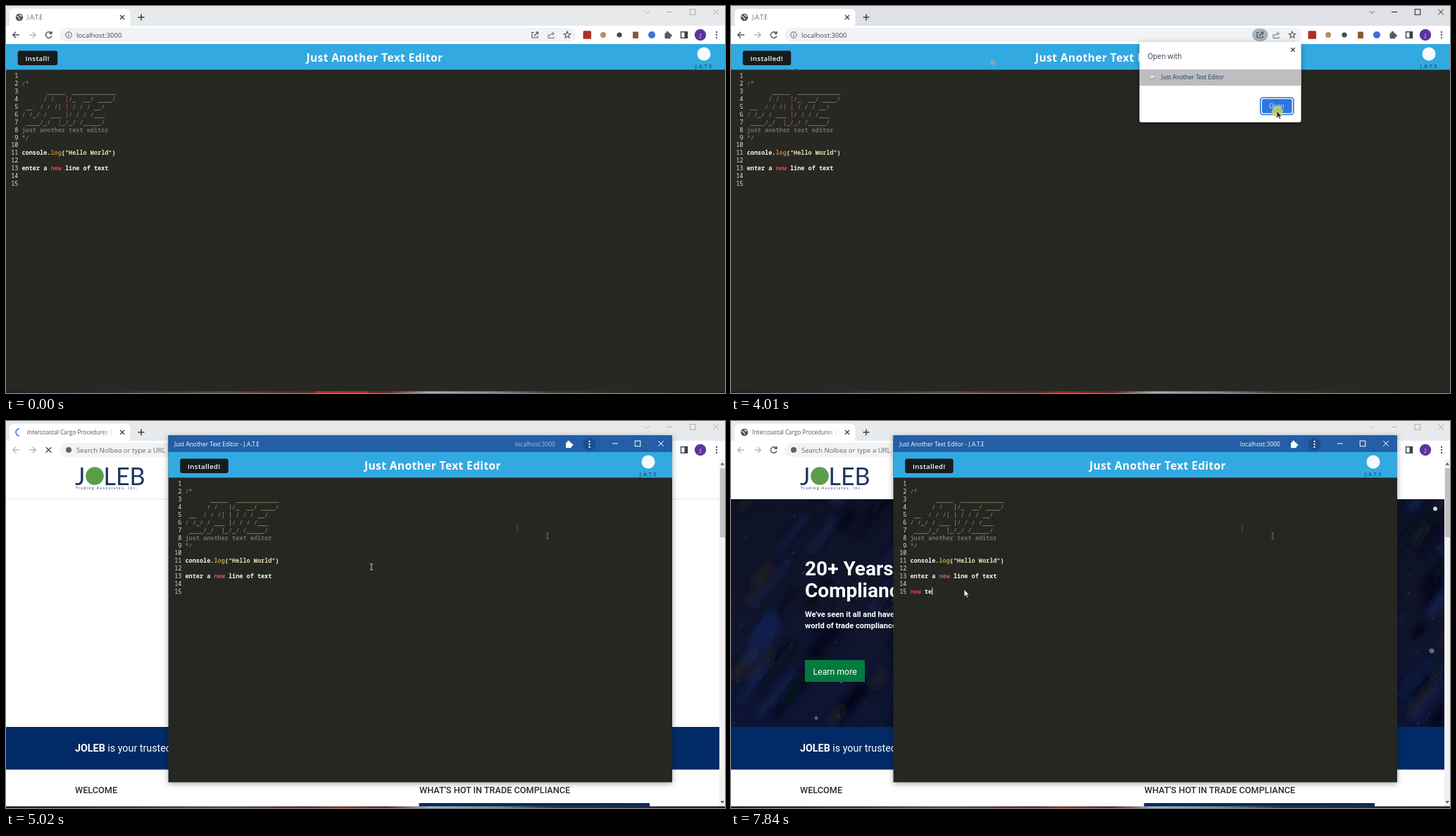
Animation, 1021 px wide and 549 px high, one loop 8000 ms. Source, as an HTML page:

```html
<!DOCTYPE html>
<html lang="en">
<head>
<meta charset="utf-8">
<title>Text editor demo</title>
<style>
html, body { margin: 0; width: 100%; height: 100%; overflow: hidden; background: #272822; }
svg { display: block; width: 1021px; height: 549px; }
text { white-space: pre; font-family: "Open Sans", "Noto Sans", sans-serif; }
.mono { font-family: "Noto Sans Mono", "DejaVu Sans Mono", monospace; font-size: 8.54px; }
.site { font-family: Roboto, Arial, sans-serif; }
.mark { font-family: Lato, sans-serif; }
</style>
</head>
<body>
<svg id="stage" viewBox="0 0 1021 549" xmlns="http://www.w3.org/2000/svg"></svg>
<script>
const LOOP = 8000, STEP = 201.2, LEAD = 25;
const stage = document.getElementById('stage');

const defs = `<defs>
  <linearGradient id="strip">
    <stop offset="0" stop-color="#1c1a20"/><stop offset=".2" stop-color="#3a3238"/>
    <stop offset=".3" stop-color="#55484c"/><stop offset=".42" stop-color="#5c2528"/>
    <stop offset=".46" stop-color="#9c2a26"/><stop offset=".53" stop-color="#6a2024"/>
    <stop offset=".59" stop-color="#a9b2b8"/><stop offset=".68" stop-color="#83888e"/>
    <stop offset=".76" stop-color="#3c3438"/><stop offset="1" stop-color="#241b20"/>
  </linearGradient>
  <linearGradient id="sky" x2="0" y2="1">
    <stop offset="0" stop-color="#0d1226"/><stop offset=".5" stop-color="#10152b"/>
    <stop offset="1" stop-color="#0d1535"/>
  </linearGradient>
  <clipPath id="heroClip"><rect x="0" y="111" width="1013" height="323"/></clipPath>
  <linearGradient id="fade"><stop offset=".85" stop-color="#fff"/><stop offset="1" stop-color="#000"/></linearGradient>
  <mask id="tabMask"><rect x="28" y="5" width="126" height="22" fill="url(#fade)"/></mask>
  <filter id="shadow" x="-10%" y="-10%" width="120%" height="125%">
    <feDropShadow dx="0" dy="2" stdDeviation="4" flood-opacity=".35"/></filter>
  <filter id="soft"><feGaussianBlur stdDeviation="1"/></filter>
  <filter id="cloud"><feGaussianBlur stdDeviation="5"/></filter>
</defs>`;

const rect = (x, y, w, h, fill, r = 0, more = '') =>
  `<rect x="${x}" y="${y}" width="${w}" height="${h}" rx="${r}" fill="${fill}" ${more}/>`;
const dot = (x, y, r, fill, more = '') => `<circle cx="${x}" cy="${y}" r="${r}" fill="${fill}" ${more}/>`;
const line = (d, color, w = 1.2, more = '') =>
  `<path d="${d}" fill="none" stroke="${color}" stroke-width="${w}" ${more}/>`;
const text = (x, y, s, size, fill, more = '') =>
  `<text x="${x}" y="${y}" font-size="${size}" fill="${fill}" ${more}>${s}</text>`;
const group = (s, more) => `<g ${more}>${s}</g>`;
const move = (x, y, s, more = '') => group(s, `transform="translate(${x} ${y})" ${more}`);
const span = (s, fill) => `<tspan fill="${fill}">${s}</tspan>`;
const cross = (x, y, r, color, w = 1.1) =>
  line(`M${x - r} ${y - r}l${2 * r} ${2 * r}M${x + r} ${y - r}l${-2 * r} ${2 * r}`, color, w);
const kebab = (x, y, color) => [-4, 0, 4].map(d => dot(x, y + d, 1.15, color)).join('');

function puzzle(x, y, color) {
  return rect(x - 4.5, y - 2.8, 8, 8, color, 1) + dot(x - .7, y - 3.4, 1.8, color) + dot(x + 4, y + 1, 1.8, color);
}

function controls(xs, y, color) {
  const [a, b, c] = xs;
  return line(`M${a - 4} ${y}h8`, color, 1) +
    rect(b - 3.8, y - 3.8, 7.6, 7.6, 'none', 0, `stroke="${color}"`) + cross(c, y, 3.8, color, 1);
}

function globe(x, y) {
  return dot(x, y, 5.2, '#50555a') +
    line(`M${x - 4} ${y - 1}q2 -1 3 1t2 3M${x} ${y - 4}q1 3 4 2`, '#e8eaec', 1.3);
}

const star = (x, y, r) => line('M' + Array.from({length: 10}, (_, i) => {
  const a = i * Math.PI / 5 - Math.PI / 2, q = i % 2 ? r * .45 : r;
  return (x + q * Math.cos(a)).toFixed(1) + ' ' + (y + q * Math.sin(a)).toFixed(1);
}).join('L') + 'Z', '#555', 1.1);

// ---- editor page ----
const art = [
  '       _____  ____________',
  '      / /   |/_  __/ ____/',
  ' __  / / /| | / / / __/',
  '/ /_/ / ___ |/ / / /___',
  ' ____/_/  |_/_/ /_____/'
];

function editor(inApp, typed) {
  const faint = inApp ? '#7b7552' : '#716d62', bar = inApp ? '#827b55' : '#945040';
  const lines = ['', span('/*', faint),
    ...art.map(s => span(s.replace(/\|/g, span('|', bar)), faint)),
    span('just another text editor', '#716e60'), span('*/', faint), '',
    'console.' + span('log', inApp ? '#b9a032' : '#c07f35') + '(' + span('"Hello World"', '#e8dfae') + ')', '',
    'enter a ' + span('new', inApp ? '#b4605a' : '#dc4644') + ' line of text', '',
    typed.replace(/^new/, span('new', '#d3337c'))];
  return lines.map((s, i) => {
    const y = 102.3 + i * 10.9;
    return `<text class="mono" x="17.4" y="${y}" text-anchor="end" fill="#e2e2db" font-weight="500">${i + 1}</text>` +
      (s ? `<text class="mono" x="22.5" y="${y}" fill="#f8f8f2" font-weight="600">${s}</text>` : '');
  }).join('');
}

function header(w, titleX, logoX, label) {
  const bw = label === 'Install!' ? 56.5 : 68.5;
  return rect(0, 54, w, 36.4, '#32a9e1') + rect(16.7, 63.5, bw, 20.5, '#191c1f', 3) +
    text(27.5, 77.6, label, 9.6, '#fff', 'font-weight="600" letter-spacing=".4"') +
    text(titleX, 79, 'Just Another Text Editor', 15.5, '#fff', 'font-weight="700" letter-spacing=".4"') +
    dot(logoX, 68, 9.5, '#f4fafd') +
    text(logoX, 88, 'J.A.T.E', 6.8, '#1d4b70', 'font-weight="600" letter-spacing=".8" text-anchor="middle"');
}

// ---- browser frame ----
function browser(k) {
  const loaded = k >= 23, away = k >= 21, blurry = away && !loaded;
  const active = k > 0 && !away, loading = away && k < 29;
  const ctl = active ? '#222' : '#a9abae';
  const tab = blurry ? 'chrome://newtab' : loaded ? 'Intercoastal Cargo Procedures |' : 'J.A.T.E';
  const ink = '#4d5156', nav = away ? '#b5b8bb' : ink;
  const spin = k * 100 - 2500;
  const left = rect(5, 4, 171.5, 26, '#fff', 6) +
    (loading ? line('M19 11a5 5 0 0 0 0 10', blurry ? '#a8c4e6' : '#2f6fd0', 1.6, `transform="rotate(${spin} 19 16)"`) : globe(19, 16)) +
    group(text(30, 19, tab, 8.2, away ? '#50545a' : '#4d6a80'), 'mask="url(#tabMask)"') +
    cross(165, 16, 3, '#3c4043', 1.4) + line('M187.5 16h9M192 11.5v9', '#3c4043', 1.5);
  const bar = rect(76, 31, 734, 20, '#f1f3f4', 10) +
    line('M19 41h-9m4 -4.2l-4.3 4.2l4.3 4.2', nav, 1.4) +
    line('M33 41h9m-4 -4.2l4.3 4.2l-4.3 4.2', '#b5b8bb', 1.4) +
    (loading ? cross(60.5, 41, 3.8, '#4d5156', 1.5) :
      line('M64.3 38.6a4.3 4.3 0 1 0 .6 3.6M65 36v3.2h-3.4', ink, 1.4)) +
    (away ? dot(89, 41, 4, blurry ? '#5b8ddb' : '#5f6368') :
      dot(89, 41, 4.3, 'none', 'stroke="#5f6368"') + line('M89 40.3v3.2M89 38.3v1.1', '#5f6368', 1.1)) +
    text(100, 44.5, away ? 'Search Nolbea or type a URL' : 'localhost:3000', 9.55, away ? '#666a6e' : '#42464a');
  const f = blurry ? 'filter="url(#soft)" opacity=".75"' : '';
  const hot = k >= 12 && k <= 20;
  return rect(0, 0, 1021, 28, active ? '#dee1e6' : '#e7eaed') + rect(0, 28, 1021, 26, '#fff') +
    group(left, f) + group(bar, f) +
    line('M906.5 7l3.5 3.5l3.5 -3.5', active ? '#666' : '#aaa', 1) + controls([942, 975, 1008], 8.5, ctl) +
    (hot ? rect(740, 32, 22.5, 18, '#a6b4bd', 9) : '') +
    line('M750 37.5h-3v7.5h8v-3M752 37h3.5v3.5M755 37.5l-5 5', '#4a4e52', 1.1) +
    line('M770 40v5.5h8v-2M771.5 43q.5 -4 5 -4M775 36.5l3.5 2.5l-3.5 2.7', '#666a6e', 1) +
    star(797, 41, 5) +
    rect(819.5, 35.3, 11.5, 11.5, '#b02f28', 1.5) + dot(848, 41, 4, '#b48e66') + dot(871, 41, 3.6, '#4a4a4a') +
    rect(890, 36.5, 8, 9.5, '#8a5a32', 1) + dot(917, 41, 5, '#3f70d8') + puzzle(940, 41, '#55595d') +
    rect(958.5, 36.7, 9, 8.6, 'none', 0, 'stroke="#3c4043" stroke-width="1.4"') + rect(963.5, 36.7, 4, 8.6, '#3c4043') +
    dot(986, 41, 8.2, '#5a35a0') + text(986, 44, 'J', 8, '#fff', 'text-anchor="middle"') + kebab(1009, 41, '#4a4e52');
}

// ---- web page behind the app ----
function makeSky() {
  let seed = 11, clouds = '', specks = '';
  const rnd = () => (seed = (seed * 16807) % 2147483647) / 2147483647;
  const across = i => i % 3 ? rnd() * 230 : 940 + rnd() * 75;
  const stroke = (i, n, color, w) => {
    const x = across(i), y = 111 + rnd() * 323, o = .25 + rnd() * .5;
    return line(`M${x.toFixed(1)} ${y.toFixed(1)}l${(n * .8).toFixed(1)} ${(-n).toFixed(1)}`, color, w, `opacity="${o.toFixed(2)}"`);
  };
  const tints = ['#14245c', '#06080f', '#25241f', '#0a0d18'];
  for (let i = 0; i < 70; i++) clouds += stroke(i, 20 + rnd() * 50, tints[i % 4], 6 + rnd() * 14);
  for (let i = 0; i < 130; i++) specks += stroke(i, 1 + rnd() * 4, i % 5 ? '#3c4f80' : '#7d8391', .9);
  return group(rect(0, 111, 1013, 323, 'url(#sky)') + group(clouds, 'filter="url(#cloud)"') + specks +
    dot(995, 326, 3.6, '#6f87ac', 'opacity=".75"') + dot(121, 421.5, 2.4, '#55705f') +
    dot(156, 370, 1.8, '#59657f'), 'clip-path="url(#heroClip)"');
}
const sky = makeSky();

function slide(k, start, s, rise) {
  const a = Math.max(0, Math.min(1, (k - start) / 2.4));
  return a ? move(0, rise * Math.pow(2.2, start + 3 - k), s, `opacity="${a}"`) : '';
}

function site(k) {
  const cls = 'class="site"', bold = cls + ' font-weight="700"', medium = cls + ' font-weight="500"';
  const head = text(105, 218.5, '20+ Years', 28, '#fff', bold) + text(105, 250, 'Compliance', 28, '#fff', bold);
  const sub = text(105, 277.5, "We've seen it all and have", 11.1, '#fff', bold) +
    text(105, 294, 'world of trade compliance', 11.1, '#fff', bold);
  const more = rect(105, 338, 85, 31, '#047a3e') + text(116.5, 358.5, 'Learn more', 12.3, '#fff', cls);
  const mark = 'class="mark"';
  return rect(0, 54, 1021, 493, '#fff') +
    text(98, 91, 'J', 34, '#1c3561', mark) + dot(126, 78, 12.8, '#5a9e4b') + text(138.5, 91, 'LEB', 34, '#1c3561', mark) +
    text(98.5, 97, 'Trading Associates, Inc.', 5.6, '#30476e', mark + ' letter-spacing="1.35"') +
    rect(0, 110, 1013, 1, '#e4e6e8') +
    (k >= 28 ? sky + dot(1000, 124.5, 2.9, k > 35 ? '#d3d7dc' : '#9a9fa8') +
      slide(k, 30, head, 3) + slide(k, 34, sub, 2) + slide(k, 36, more, 1) : '') +
    rect(0, 434, 1013, 60.5, '#022a66') +
    text(98, 469, '<tspan font-weight="700">JOLEB</tspan> is your trusted', 14.3, '#fff', cls) +
    text(98, 527.8, 'WELCOME', 12.7, '#2c2c2c', medium) +
    text(587, 527.8, "WHAT'S HOT IN TRADE COMPLIANCE", 12.7, '#2c2c2c', medium) + rect(586.5, 542, 327.5, 6, '#022a66') +
    rect(1013, 54, 8, 493, '#f1f1f1') + rect(1014, 67, 7, 98, '#c1c1c1') +
    '<path d="M1014.5 62.5l2.8 -3.5l2.8 3.5zM1014.5 539l2.8 3.5l2.8 -3.5z" fill="#555"/>';
}

// ---- popup and app window ----
function popup() {
  return group(rect(580, 51, 229.5, 114, '#fff', 3), 'filter="url(#shadow)"') +
    text(591.5, 75, 'Open with', 10.1, '#2b3a4c') + cross(798, 62, 2.8, '#3c4043', 1.3) +
    rect(580, 90, 229.5, 23, '#bebec1') + rect(595.5, 98.5, 5, 4, '#e4e4e6') + rect(594.5, 102.5, 7, 1, '#8c8c90') +
    text(611, 104.2, 'Just Another Text Editor', 8.15, '#1d3557') +
    rect(751.8, 130, 47, 24, '#fff', 4, 'stroke="#2c6ccd" stroke-width="1.6"') + rect(754, 132, 42.6, 20, '#2b78e0', 2.5) +
    text(775, 145, 'Open', 8.4, '#e8f1fd', 'text-anchor="middle"');
}

function app(k) {
  const typed = 'new te'.slice(0, Math.max(0, k - 33)), later = k >= 25;
  const caret = k >= 34 ? rect(22.6 + typed.length * 5.125, 246.5, 1, 10, '#f0f0ea') : '';
  const body = move(232, -10, editor(true, typed) + caret);
  const top = move(230.5, -10, header(715.5, 278.5, 681.5, 'Installed!'));
  const s = group(rect(230.5, 20.5, 715.5, 492, '#272822'), 'filter="url(#shadow)"') +
    rect(230.5, 20.5, 715.5, 24, '#235ea6') + top + body +
    text(239, 35.5, 'Just Another Text Editor - J.A.T.E', 8.35, '#fff') +
    (later ? text(723, 36, 'localhost:3000', 8.45, k === 25 ? '#a5c0de' : '#fff') + dot(828.5, 33, 9, '#1c4f8f') : '') +
    puzzle(later ? 799.5 : 798, 33, '#fff') + kebab(828.5, 33, '#fff') + controls([865, 897, 930], 32, '#fff') +
    (later ? beam(726, 153, '#3c4a66') + beam(769, 163, '#77776f') : '');
  return k === 21 ? group(s, 'opacity=".6" transform="translate(588 267) scale(.95) translate(-588 -267)"') : s;
}

// ---- pointer ----
const beam = (x, y, color) => line(`M${x - 2} ${y - 4}h4M${x} ${y - 4}v8M${x - 2} ${y + 4}h4`, color, 1);
const arrow = (x, y, fill, edge) => `<path transform="translate(${x} ${y})" d="M0 0v10l2.4 -2l1.7 3.5l1.6 -.8l-1.6 -3.3h3.2z" fill="${fill}" stroke="${edge}" stroke-width=".7"/>`;

// step, x, y
const path = [[1, 70, 78], [6, 88, 84], [7, 120, 84], [9, 369, 74], [11, 735, 41], [12, 752, 40], [14, 752, 41],
  [17, 775, 149], [20, 775, 149], [22, 769, 163], [24, 726, 153], [25, 519, 207], [28, 331, 239], [40, 331, 239]];

function pointer(k) {
  const i = path.findIndex(p => p[0] > k);
  if (i < 1) return '';
  const [a, ax, ay] = path[i - 1], [b, bx, by] = path[i], u = (k - a) / (b - a);
  const x = ax + (bx - ax) * u, y = ay + (by - ay) * u;
  if (k === 11) return beam(x, y, '#333');
  if (k >= 22 && k < 28) return beam(x, y, '#c9c9c4');
  const click = k === 13 || k === 19 || k === 20;
  return (click ? dot(x + 1, y + 1, 8.2, '#d8dc55', 'opacity=".75"') : '') +
    (k < 21 ? arrow(x, y, '#333', '#ddd') : arrow(x, y, '#e9ebf2', '#222'));
}

function draw(k) {
  const away = k >= 21, installed = k >= 2;
  let s = defs + rect(0, 0, 1021, 549, '#272822');
  if (!away) {
    s += header(1021, installed ? 432 : 426.5, 991, installed ? 'Installed!' : 'Install!') + editor(false, '');
    if (installed) s += line('M74 90h4M91.5 89.5h3', '#27465a', 1);
    if (k >= 10) s += arrow(369, 74, '#8aa3b0', '#8aa3b0');
  } else if (k >= 23) s += site(k);
  s += browser(k);
  if (k >= 14 && !away) s += popup();
  if (away) s += app(k);
  s += rect(0, 546.6, 1021, 2.4, 'url(#strip)') + (k ? '' : rect(440, 546.6, 75, 2.4, '#b23226'));
  stage.innerHTML = s + pointer(k);
}

let shown = -1;
const began = performance.now();
function tick() {
  const t = (performance.now() - began) % LOOP;
  const k = Math.min(39, Math.floor((t + LEAD) / STEP));
  if (k !== shown) draw(shown = k);
  requestAnimationFrame(tick);
}
tick();
</script>
</body>
</html>
```
